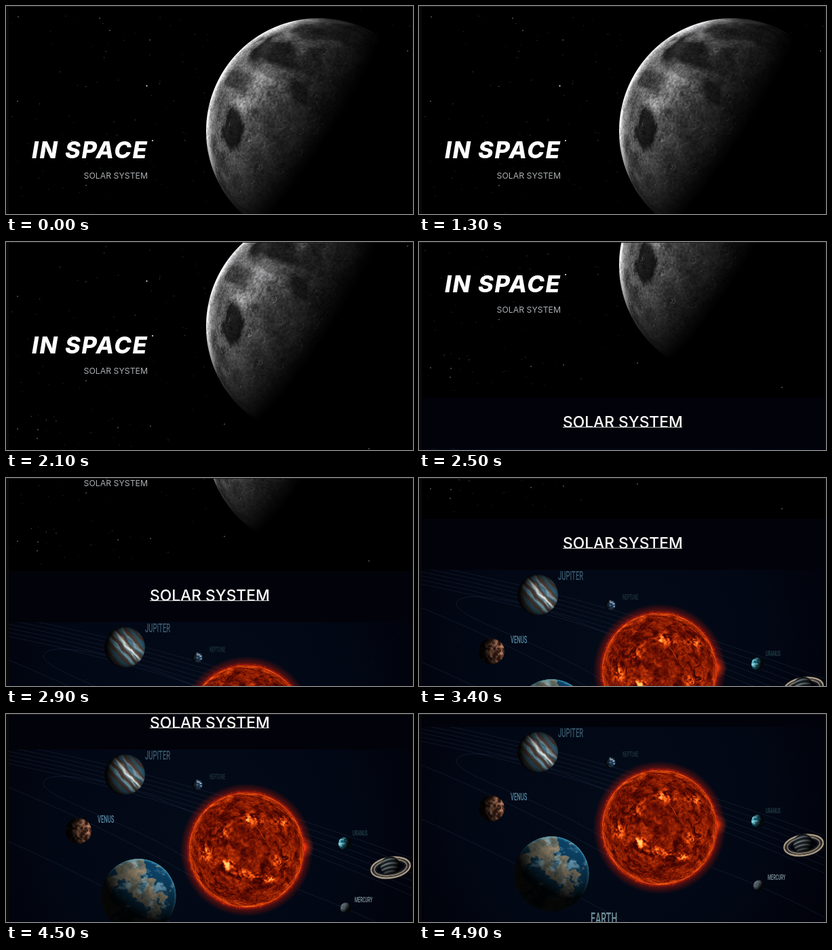
An HTML page with a canvas for the animation above (5 s loop, 600 by 306 pixels).

```html
<!DOCTYPE html>
<html lang="en">
<head>
<meta charset="utf-8">
<title>In Space</title>
<style>
html, body { margin: 0; width: 100%; height: 100%; overflow: hidden; background: #000; }
canvas { display: block; width: 600px; height: 306px; }
</style>
</head>
<body>
<canvas id="stage" width="600" height="306"></canvas>
<script>
const W = 600, H = 306, LOOP = 5000, STEP = 100;
const HERO_END = 379, MAP_TOP = 454, MAP_SHIFT = 435, PAGE_H = 745;
const TAU = Math.PI * 2;

// Scroll offsets per 100 ms, from the first wheel movement on
const SCROLL_START = 1600;
const SCROLL = [2, 7, 14, 26, 42, 60, 82, 104, 127, 150, 173, 197, 220, 242, 262, 279, 294, 307,
  319, 337, 351, 362, 362, 374, 388, 394, 397, 397, 399, 402, 402, 410, 424, 435];

const clamp = (v, a = 0, b = 1) => Math.min(b, Math.max(a, v));
const mix = (a, b, t) => a.map((v, i) => v + (b[i] - v) * t);
const smooth = (a, b, v) => { const t = clamp((v - a) / (b - a)); return t * t * (3 - 2 * t); };
const dot = (a, b) => a[0] * b[0] + a[1] * b[1] + a[2] * b[2];

function seeded(seed) {
  return () => {
    seed = seed + 0x6D2B79F5 | 0;
    let t = Math.imul(seed ^ seed >>> 15, 1 | seed);
    t = t + Math.imul(t ^ t >>> 7, 61 | t) ^ t;
    return ((t ^ t >>> 14) >>> 0) / 4294967296;
  };
}

function hash(x, y) {
  let h = Math.imul(x, 374761393) + Math.imul(y, 668265263) | 0;
  h = Math.imul(h ^ h >>> 13, 1274126177);
  return ((h ^ h >>> 16) >>> 0) / 4294967296;
}

function noise(x, y) {
  const i = Math.floor(x), j = Math.floor(y);
  let u = x - i, v = y - j;
  u *= u * (3 - 2 * u);
  v *= v * (3 - 2 * v);
  const top = hash(i, j) * (1 - u) + hash(i + 1, j) * u;
  const low = hash(i, j + 1) * (1 - u) + hash(i + 1, j + 1) * u;
  return top * (1 - v) + low * v;
}

function fbm(x, y, octaves = 5) {
  let sum = 0, amp = 0.5, total = 0;
  for (let i = 0; i < octaves; i++) {
    sum += amp * noise(x, y);
    total += amp;
    amp /= 2;
    x = x * 2.03 + 17;
    y = y * 2.03 + 31;
  }
  return sum / total;
}

function newCanvas(w, h) {
  const c = document.createElement('canvas');
  c.width = w;
  c.height = h;
  return c;
}

// Shades a sphere pixel by pixel at double resolution
function ball(ctx, cx, cy, r, shade) {
  const n = Math.ceil(r * 2 + 2) * 2, c = newCanvas(n, n), g = c.getContext('2d');
  const img = g.createImageData(n, n);
  for (let j = 0, p = 0; j < n; j++) {
    for (let i = 0; i < n; i++, p += 4) {
      const x = (i + 0.5 - n / 2) / (2 * r), y = (j + 0.5 - n / 2) / (2 * r);
      const d = Math.hypot(x, y), alpha = clamp((1 - d) * 2 * r + 0.5);
      if (!alpha) continue;
      const rgb = shade(x, y, Math.sqrt(Math.max(0, 1 - d * d)));
      for (let k = 0; k < 3; k++) img.data[p + k] = clamp(rgb[k], 0, 255);
      img.data[p + 3] = alpha * 255;
    }
  }
  g.putImageData(img, 0, 0);
  ctx.drawImage(c, cx - n / 4, cy - n / 4, n / 2, n / 2);
}

function planet(ctx, cx, cy, r, light, surface) {
  ball(ctx, cx, cy, r, (x, y, z) => {
    const lit = 0.05 + 1.15 * Math.max(0, dot([x, y, z], light));
    return surface(x, y, z).map(v => v * lit);
  });
}

function glow(ctx, x, y, r0, r1, rgb, alpha) {
  const g = ctx.createRadialGradient(x, y, r0, x, y, r1);
  g.addColorStop(0, `rgba(${rgb},${alpha})`);
  g.addColorStop(0.4, `rgba(${rgb},${alpha * 0.36})`);
  g.addColorStop(1, `rgba(${rgb},0)`);
  ctx.fillStyle = g;
  ctx.beginPath();
  ctx.arc(x, y, r1, 0, TAU);
  ctx.fill();
}

function text(ctx, str, x, y, font, color, spacing = 0) {
  ctx.font = font;
  ctx.fillStyle = color;
  ctx.letterSpacing = spacing + 'px';
  ctx.fillText(str, x, y);
}

// Condensed lettering shared by all planet names
function label(ctx, str, x, y, size, color) {
  ctx.save();
  ctx.translate(x, y);
  ctx.scale(0.52, 1);
  text(ctx, str, 0, 0, `500 ${size}px Roboto, sans-serif`, color);
  ctx.restore();
}

function dotAt(ctx, x, y, r, alpha) {
  ctx.fillStyle = `rgba(225,230,235,${alpha})`;
  ctx.beginPath();
  ctx.arc(x, y, r, 0, TAU);
  ctx.fill();
}

function drawStars(ctx) {
  const rnd = seeded(41);
  for (let i = 0; i < 150; i++) {
    const right = i % 6 === 0;
    const x = right ? 500 + rnd() * 96 : 5 + rnd() * 300;
    dotAt(ctx, x, 4 + rnd() * 370, 0.35 + rnd() * 0.3, 0.12 + rnd() * 0.4);
  }
  const bright = [[207.5, 117.5], [216, 198], [97, 198], [138, 18], [212, 50], [18, 16], [17, 140],
    [153, 36], [17, 335], [47, 336], [46, 349], [165, 333], [213, 331], [322, 328], [535, 364], [592, 66], [118, 264]];
  bright.forEach(([x, y], i) => dotAt(ctx, x, y, i < 2 ? 1.1 : 0.7, i < 2 ? 1 : 0.75));
}

function drawMoon(ctx) {
  const cx = 461, cy = 184, r = 166, light = [-0.82, -0.54, 0.1];
  // x, y, rx, ry, darkness (negative is brighter)
  const patches = [[397, 70, 32, 21, 0.6], [335, 178, 13, 25, 0.72], [343, 114, 20, 15, 0.4],
    [480, 40, 46, 13, 0.4], [445, 82, 30, 20, 0.35], [432, 126, 15, 22, 0.35],
    [366, 128, 32, 26, -0.4], [350, 190, 32, 44, -0.25], [410, 130, 14, 16, -0.3]];
  ball(ctx, cx, cy, r, (x, y, z) => {
    const lit = Math.max(0, dot([x, y, z], light));
    const u = x * 1.5 / (0.6 + z * 0.6), v = y * 1.5 / (0.6 + z * 0.6);
    const wobble = (fbm(u * 5 + 9, v * 5 + 4, 4) - 0.5) * 1.5;
    const grain = fbm(u * 42 + 50, v * 42 + 70, 3);
    let tone = 0.44 + (fbm(u * 4 + 20, v * 4 + 30) - 0.5) * 0.5 + (grain - 0.5) * 0.4;
    for (const [px, py, rx, ry, dark] of patches) {
      const d = Math.hypot((cx + x * r - px) / rx, (cy + y * r - py) / ry) + wobble;
      tone *= 1 - dark * (1 - smooth(0.65, 1.3, d));
    }
    const rim = smooth(0.4, 0.05, z) * smooth(0.45, 0.85, lit);
    const value = 270 * tone * Math.pow(lit, 1.15) + rim * 190 * (0.5 + tone);
    return [value, value, value * 1.01];
  });

  const rnd = seeded(8), facing = Math.atan2(light[1], light[0]);
  for (let i = 0; i < 240; i++) {
    const a = rnd() * TAU, d = Math.sqrt(rnd()) * 0.97;
    const x = Math.cos(a) * d, y = Math.sin(a) * d, z = Math.sqrt(1 - d * d);
    const lit = dot([x, y, z], light), size = 0.8 + Math.pow(rnd(), 3) * 5;
    if (lit < 0.03 || y < -0.35 && rnd() < 0.7) continue;
    ctx.save();
    ctx.translate(cx + x * r, cy + y * r);
    ctx.rotate(a);
    ctx.scale(Math.max(0.25, z), 1);
    ctx.lineWidth = 0.8;
    [['0,0,0', 0], ['220,220,220', Math.PI]].forEach(([rgb, turn]) => {
      const mid = facing - a + turn;
      ctx.strokeStyle = `rgba(${rgb},${clamp(lit * 0.65, 0, 0.38)})`;
      ctx.beginPath();
      ctx.arc(0, 0, size, mid - 1.5, mid + 1.5);
      ctx.stroke();
    });
    ctx.restore();
  }
}

function drawOrbits(ctx) {
  ctx.strokeStyle = 'rgba(105,130,180,0.2)';
  ctx.lineWidth = 0.7;
  for (let i = 0; i < 6; i++) {
    ctx.beginPath();
    ctx.moveTo(4, 10 + 6 * i);
    ctx.quadraticCurveTo(280, 64 + 6 * i, 600, 180 + 11 * i);
    ctx.stroke();
  }
  ctx.beginPath();
  ctx.moveTo(340, 145);
  ctx.bezierCurveTo(230, 80, 60, 38, 55, 69);
  ctx.bezierCurveTo(55, 92, 200, 130, 290, 195);
  ctx.moveTo(4, 75);
  ctx.quadraticCurveTo(140, 130, 300, 220);
  ctx.moveTo(4, 155);
  ctx.quadraticCurveTo(110, 200, 330, 320);
  ctx.moveTo(430, 225);
  ctx.quadraticCurveTo(520, 258, 600, 300);
  ctx.stroke();
}

function drawSun(ctx) {
  const cx = 354.5, cy = 167, r = 84.5, rnd = seeded(77);
  glow(ctx, cx, cy, 82, 98, '225,28,6', 0.9);
  glow(ctx, 438, 163, 2, 17, '255,60,15', 0.9);
  for (let i = 0; i < 260; i++) {
    const a = rnd() * TAU, len = 1 + rnd() * 3, lean = (rnd() - 0.5) * 0.06;
    ctx.strokeStyle = `rgba(255,${40 + rnd() * 40 | 0},15,${0.15 + rnd() * 0.35})`;
    ctx.beginPath();
    ctx.moveTo(cx + Math.cos(a) * (r - 2), cy + Math.sin(a) * (r - 2));
    ctx.lineTo(cx + Math.cos(a + lean) * (r + len), cy + Math.sin(a + lean) * (r + len));
    ctx.stroke();
  }
  const flares = [[362, 122, 13, 6], [405, 125, 11, 6], [320, 140, 9, 10], [326, 190, 10, 10],
    [354, 204, 14, 7], [404, 183, 10, 9], [386, 209, 11, 6], [296, 172, 7, 10]];
  ball(ctx, cx, cy, r, (x, y, z) => {
    const u = x * 1.4 / (0.5 + z * 0.6), v = y * 1.4 / (0.5 + z * 0.6);
    const warp = fbm(u * 4 + 3, v * 4 + 8, 3);
    const n = fbm(u * 6 + warp * 3 + 40, v * 6 + warp * 3 + 12);
    const fine = fbm(u * 22 + 5, v * 22 + 15, 3);
    let heat = 0.2 + (n - 0.5) * 0.6 + (fine - 0.5) * 0.3;
    for (const [px, py, rx, ry] of flares) {
      const d = Math.hypot((cx + x * r - px) / rx, (cy + y * r - py) / ry);
      heat += 0.9 * Math.exp(-d * d) * smooth(0.3, 0.75, n * 0.65 + fine * 0.35);
    }
    heat = clamp(heat + smooth(0.5, 0.05, z) * 0.3, 0.03, 1);
    return [48 + 340 * heat, 4 + 205 * Math.pow(heat, 1.6), 2 + 110 * Math.pow(heat, 3.2)];
  });
  // Thin bright filament
  ctx.strokeStyle = 'rgba(240,95,25,0.6)';
  ctx.lineWidth = 1;
  ctx.beginPath();
  ctx.moveTo(362, 124);
  ctx.quadraticCurveTo(372, 134, 381, 152);
  ctx.stroke();
}

function drawEarth(ctx) {
  planet(ctx, 195.3, 235.2, 55.3, [0.45, -0.7, 0.42], (x, y, z) => {
    const land = fbm(x * 2.6 + 12, y * 2.6 + 5) + 0.2 * Math.exp(-((x + 0.25) ** 2 + (y + 0.5) ** 2) * 5) - x * 0.12;
    const cloud = fbm(x * 5 + y * 2 + 60, y * 8 - x * 2 + 24);
    const dry = mix([58, 78, 78], [176, 148, 116], fbm(x * 9 + 2, y * 9 + 7, 3));
    let c = mix([10, 58, 90], dry, smooth(0.54, 0.6, land));
    c = mix(c, [150, 195, 210], smooth(0.54, 0.8, cloud) * 0.65);
    return mix(c, [85, 200, 230], smooth(0.42, 0, z) * 0.7);
  });
}

function drawSaturn(ctx) {
  const cx = 567, cy = 193;
  const ring = (from, to) => {
    [[29, 15, 2.4, '#a89a84'], [26.2, 13, 1.2, '#4a443d'], [24, 11.5, 2, '#81786a'], [21, 9.6, 0.8, '#36342f']]
      .forEach(([rx, ry, width, color]) => {
        ctx.strokeStyle = color;
        ctx.lineWidth = width;
        ctx.beginPath();
        ctx.ellipse(cx, cy, rx, ry, -0.16, from, to);
        ctx.stroke();
      });
  };
  ring(Math.PI, TAU);
  planet(ctx, cx - 0.5, cy - 2, 14.5, [-0.5, -0.25, 0.7], (x, y) => {
    const band = 0.5 + 0.5 * Math.sin((y + x * 0.16 - x * x * 0.25) * 15);
    return mix([22, 30, 36], [112, 118, 118], band * band);
  });
  ring(0, Math.PI);
}

function drawPlanets(ctx) {
  planet(ctx, 175, 56, 30, [0.4, 0, 0.78], (x, y) => {
    const across = (y - x * 1.15) * 0.66, along = (x * 0.66 + y * 0.75);
    const n = fbm(across * 9 + 20, along * 2.5 + 6, 4);
    const band = across + (n - 0.5) * 0.26;
    let c = mix([46, 92, 112], [78, 52, 42], 0.5 + 0.5 * Math.sin(band * 19));
    c = mix(c, [215, 222, 218], Math.exp(-(((band + 0.13) * 11) ** 2)));
    c = mix(c, [150, 190, 200], 0.7 * Math.exp(-(((band - 0.22) * 15) ** 2)));
    return mix(c, [170, 190, 195], 0.6 * Math.exp(-(((band + 0.48) * 15) ** 2)));
  });
  planet(ctx, 107, 139, 19, [0.72, -0.1, 0.52], (x, y) =>
    mix([44, 22, 16], [200, 138, 106], smooth(0.3, 0.8, fbm(x * 5 + 8, y * 5 + 2))));
  planet(ctx, 282, 71, 7.5, [0.5, -0.1, 0.6], (x, y) =>
    mix([30, 62, 96], [195, 215, 228], smooth(0.4, 0.75, fbm(x * 3 + 5, y * 4 + 9))));
  planet(ctx, 499.5, 157.5, 9.5, [-0.75, -0.2, 0.4], (x, y) =>
    mix([22, 112, 138], [150, 220, 228], smooth(0.3, 0.75, fbm(x * 4 + 4, y * 5 + 1))));
  planet(ctx, 501, 252.5, 8, [-0.6, -0.45, 0.4], (x, y) =>
    mix([42, 56, 64], [145, 162, 168], fbm(x * 4 + 9, y * 4 + 2)));
  drawEarth(ctx);
  drawSaturn(ctx);
}

function drawMap(ctx) {
  ctx.save();
  ctx.translate(0, MAP_SHIFT);
  const top = MAP_TOP - MAP_SHIFT;
  const bg = ctx.createRadialGradient(290, 130, 30, 290, 130, 350);
  bg.addColorStop(0, '#030a18');
  bg.addColorStop(0.6, '#020714');
  bg.addColorStop(1, '#01020a');
  ctx.fillStyle = bg;
  ctx.fillRect(4, top, 594, 300);
  ctx.beginPath();
  ctx.rect(4, top, 594, 300);
  ctx.clip();
  const rnd = seeded(19);
  for (let i = 0; i < 110; i++) dotAt(ctx, rnd() * W, top + rnd() * 290, 0.4, 0.06 + rnd() * 0.2);
  drawOrbits(ctx);
  drawSun(ctx);
  drawPlanets(ctx);
  label(ctx, 'JUPITER', 205, 33.5, 18.3, '#38586a');
  label(ctx, 'NEPTUNE', 300, 62.5, 10, '#1e343e');
  label(ctx, 'VENUS', 135, 126.5, 14.8, '#5488a2');
  label(ctx, 'URANUS', 511, 146, 10.8, '#234349');
  label(ctx, 'MERCURY', 514, 244, 11, '#8499a2');
  label(ctx, 'EARTH', 253, 308.5, 24, '#71909c');
  ctx.restore();
}

function buildPage() {
  const page = newCanvas(W, PAGE_H), ctx = page.getContext('2d');
  ctx.fillStyle = '#000';
  ctx.fillRect(0, 0, W, PAGE_H);
  drawStars(ctx);
  drawMoon(ctx);
  text(ctx, 'IN SPACE', 38, 224, 'italic 800 34.5px Inter, sans-serif', '#fff', 1.7);
  text(ctx, 'SOLAR SYSTEM', 114.5, 254, '400 12.3px Inter, sans-serif', '#a9adb0');
  ctx.fillStyle = '#02020a';
  ctx.fillRect(4, HERO_END, 594, MAP_TOP - HERO_END);
  text(ctx, 'SOLAR SYSTEM', 212, 423, '500 22.8px Inter, sans-serif', '#fff');
  ctx.fillStyle = '#c4c4c8';
  ctx.fillRect(212, 422, 176, 1);
  drawMap(ctx);
  return page;
}

const stage = document.getElementById('stage').getContext('2d');
const page = buildPage();
const start = performance.now();

function scrollAt(t) {
  return t < SCROLL_START ? 0 : SCROLL[Math.min(SCROLL.length - 1, Math.floor((t - SCROLL_START) / STEP))];
}

function frame() {
  stage.drawImage(page, 0, -scrollAt((performance.now() - start) % LOOP));
  stage.fillStyle = '#090909';
  stage.fillRect(0, 0, 4, H);
  stage.fillRect(598, 0, 2, H);
  stage.fillStyle = '#1c1c1c';
  stage.fillRect(0, 0, W, 1);
  requestAnimationFrame(frame);
}
frame();
</script>
</body>
</html>
```
